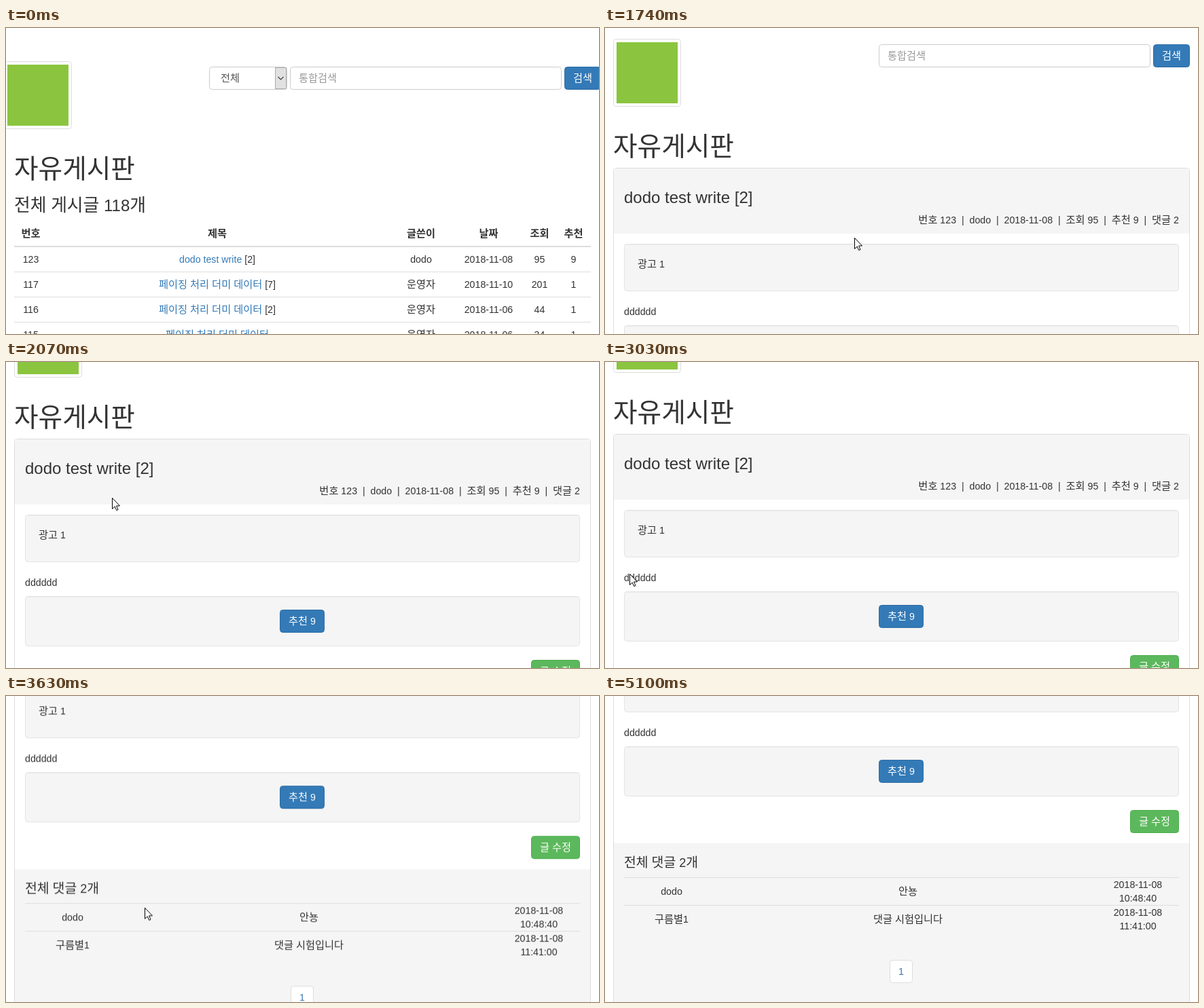
An HTML page for the animation above (7110 ms loop, 873 by 451 pixels).

```html
<!DOCTYPE html>
<html lang="ko">
<head>
<meta charset="utf-8">
<title>자유게시판</title>
<style>
html, body { margin: 0; width: 100%; height: 100%; overflow: hidden; background: #fff; }
svg { display: block; width: 873px; height: 451px; }
text { font: 14.2px "Liberation Sans", "Noto Sans CJK KR", "Noto Sans CJK", sans-serif; fill: #333; }
.ko { font-size: 1.075em; }
.h1 { font-size: 36px; }
.h2 { font-size: 24px; }
.h4 { font-size: 18px; }
.h1 .ko, .h2 .ko { font-weight: 300; }
.mid text { text-anchor: middle; }
.end { text-anchor: end; }
.head text { font-weight: bold; }
.link { fill: #337ab7; }
.on { fill: #fff; }
.hint { fill: #999; }
.box { fill: #fff; stroke: #ccc; }
.thumb { fill: #fff; stroke: #ddd; }
.blue { fill: #337ab7; stroke: #2e6da4; }
.green { fill: #5cb85c; stroke: #4cae4c; }
.well { fill: #f5f5f5; stroke: #e3e3e3; }
.bar { fill: #f5f5f5; }
.line { fill: #ddd; }

.list, .post, .scroll, .cursor, .arrow, .hand, .beam { animation: 7.11s linear infinite; }
.list, .post, .arrow, .hand, .beam { animation-timing-function: step-end; }
.list { animation-name: list; }
.post { animation-name: post; }
.scroll { animation-name: scroll; }
.cursor { animation-name: move; }
.arrow { animation-name: arrow; }
.hand { animation-name: hand; }
.beam { animation-name: beam; }

@keyframes list { 0% { opacity: 1 } 15.61%, 100% { opacity: 0 } }
@keyframes post { 0% { opacity: 0 } 15.61%, 100% { opacity: 1 } }
@keyframes scroll {
  0%, 22.785% { transform: translateY(0) }
  24.4726% { transform: translateY(-33px) }
  29.1139% { transform: translateY(-126px) }
  32.489%, 45.992% { transform: translateY(-133px) }
  49.3671% { transform: translateY(-206px) }
  51.4768%, 100% { transform: translateY(-397px) }
}
@keyframes move {
  0%, 1.265% { transform: translate(848px, 60px) }
  2.11% { transform: translate(747px, 122px) }
  2.532% { transform: translate(688px, 158px) }
  3.797% { transform: translate(565px, 235px) }
  6.329% { transform: translate(380px, 318px) }
  9.705%, 15.61% { transform: translate(312px, 340px) }
  17.2996% { transform: translate(318px, 328px) }
  20.675%, 22.785% { transform: translate(350px, 315px) }
  24.4726% { transform: translate(367px, 309px) }
  29.1139% { transform: translate(156px, 200px) }
  32.489% { transform: translate(60px, 330px) }
  35.021% { transform: translate(150px, 362px) }
  37.553% { transform: translate(164px, 330px) }
  40.084% { transform: translate(70px, 312px) }
  42.616%, 43.038% { transform: translate(36px, 312px) }
  43.882%, 45.992% { transform: translate(167px, 312px) }
  49.3671% { transform: translate(200px, 311px) }
  51.477%, 54.852% { transform: translate(205px, 312px) }
  56.118% { transform: translate(154px, 318px) }
  59.0717% { transform: translate(410px, 319px) }
  60.759% { transform: translate(428px, 316px) }
  64.557%, 64.979% { transform: translate(205px, 300px) }
  67.089% { transform: translate(400px, 242px) }
  69.62% { transform: translate(640px, 342px) }
  71.73%, 100% { transform: translate(815px, 300px) }
}
@keyframes arrow {
  0% { opacity: 0 } 1.26% { opacity: 1 } 7.59% { opacity: 0 } 15.61% { opacity: 1 }
  57.8% { opacity: 0 } 62.44% { opacity: 1 } 71.72%, 100% { opacity: 0 }
}
@keyframes hand { 0% { opacity: 0 } 7.59% { opacity: 1 } 15.61%, 100% { opacity: 0 } }
@keyframes beam { 0% { opacity: 0 } 57.8% { opacity: 1 } 62.44%, 100% { opacity: 0 } }
</style>
</head>
<body>
<svg viewBox="0 0 873 451">
  <defs>
    <g id="logo">
      <rect class="thumb" x="12.5" y="49.5" width="99" height="99" rx="4"/>
      <rect x="17" y="54" width="90" height="90" fill="#8bc53f"/>
    </g>
    <g id="search">
      <rect class="box" x="403.5" y="57.5" width="399" height="33" rx="4"/>
      <text class="hint" x="416" y="79">통합검색</text>
      <rect class="blue" x="807.5" y="57.5" width="53" height="33" rx="4"/>
      <text class="on" x="820" y="79">검색</text>
    </g>
    <text id="title" class="h1" x="12" y="221">자유게시판</text>
  </defs>

  <g class="list">
    <use href="#logo" x="-15"/>
    <rect class="box" x="299.5" y="57.5" width="114" height="33" rx="4"/>
    <text x="316" y="79" style="fill:#555">전체</text>
    <rect x="396.5" y="58.5" width="16" height="31" fill="#e1e1e1" stroke="#adadad"/>
    <path d="M400.5 72l4 4 4-4" fill="none" stroke="#444" stroke-width="1.2"/>
    <use href="#search" x="15"/>
    <use href="#title"/>
    <text class="h2" x="12" y="270">전체 게시글 118개</text>
    <rect class="line" x="12" y="321" width="849" height="2"/>
    <g class="mid" id="rows"></g>
    <rect class="link hand" x="255" y="347" width="92" height="1"/>
  </g>

  <g class="post">
    <g class="scroll">
      <use href="#logo"/>
      <use href="#search"/>
      <use href="#title"/>
      <rect class="thumb" x="12.5" y="239.5" width="848" height="700" rx="4"/>
      <rect class="bar" x="13" y="240" width="847" height="96" rx="3"/>
      <text class="h2" x="28" y="291">dodo test write [2]</text>
      <text class="end" id="meta" x="845" y="321"></text>

      <rect class="well" x="28.5" y="351.5" width="816" height="69" rx="4"/>
      <path d="M30 352.5H843" stroke="#ececec"/>
      <text x="48" y="386">광고 1</text>
      <text x="28" y="456">dddddd</text>
      <rect class="well" x="28.5" y="471.5" width="816" height="73" rx="4"/>
      <path d="M30 472.5H843" stroke="#ececec"/>
      <rect class="blue" x="403.5" y="491.5" width="65" height="33" rx="4"/>
      <text class="on" x="416" y="513">추천 9</text>
      <rect class="green" x="773.5" y="565.5" width="71" height="33" rx="4"/>
      <text class="on" x="786" y="587">글 수정</text>

      <rect class="bar" x="13" y="614" width="847" height="320"/>
      <text class="h4" x="28" y="649">전체 댓글 2개</text>
      <g class="mid" id="replies"></g>
      <rect class="thumb" x="419.5" y="786.5" width="33" height="33" rx="4"/>
      <g class="mid"><text class="link" x="436" y="808">1</text></g>
    </g>
  </g>

  <g class="cursor">
    <path class="arrow" d="M.5 .5V16.5L4.2 13 6.7 18.6 9 17.6 6.6 12H11.5Z" fill="#fff" stroke="#000"/>
    <path class="hand" d="M-1.5 1.5q1.5-2 3 0V8q7-1 9 3v4l-2 6H0L-5.5 13q0-3 4 0Z" fill="#fff" stroke="#000"/>
    <path class="beam" d="M-3-7.5H-1L.5-6.5 2-7.5H4M.5-6.5V7.5M-3 8.5H-1L.5 7.5 2 8.5H4" fill="none" stroke="#000"/>
  </g>
</svg>
<script>
const $ = id => document.getElementById(id);
const text = (x, y, s) => `<text x="${x}" y="${y}">${s}</text>`;
const line = (x, y, w) => `<rect class="line" x="${x}" y="${y}" width="${w}" height="1"/>`;
const link = s => `<tspan class="link">${s}</tspan>`;

const cols = [36.5, 311, 611, 710.5, 785.5, 835.5];
const cells = (row, y) => row.map((s, i) => text(cols[i], y, s)).join('');
const dummy = link('페이징 처리 더미 데이터');
const rows = [
  [123, link('dodo test write') + ' [2]', 'dodo', '2018-11-08', 95, 9],
  [117, dummy + ' [7]', '운영자', '2018-11-10', 201, 1],
  [116, dummy + ' [2]', '운영자', '2018-11-06', 44, 1],
  [115, dummy, '운영자', '2018-11-06', 34, 1]
];
$('rows').innerHTML =
  `<g class="head">${cells(['번호', '제목', '글쓴이', '날짜', '조회', '추천'], 308)}</g>` +
  rows.map((row, i) => cells(row, 346 + 37 * i) + line(12, 359 + 37 * i, 849)).join('');

const replies = [['dodo', '안뇽', '10:48:40'], ['구름별1', '댓글 시험입니다', '11:41:00']];
$('replies').innerHTML = replies.map(([who, body, time], i) => {
  const y = 690 + 41 * i;
  return line(28, y - 26, 817) + text(98, y, who) + text(446, y, body) +
    text(784.5, y - 10, '2018-11-08') + text(784.5, y + 10, time);
}).join('');

$('meta').innerHTML = ['번호 123', 'dodo', '2018-11-08', '조회 95', '추천 9', '댓글 2']
  .join('&nbsp;&nbsp;|&nbsp;&nbsp;');

// Hangul is set slightly larger so that it fills the full em.
document.querySelectorAll('text').forEach(t => {
  t.innerHTML = t.innerHTML.replace(/[가-힣]+/g, '<tspan class="ko">$&</tspan>');
});

// Advance every animation in 30 ms ticks; the small lead absorbs rounding.
document.getAnimations().forEach(a => a.effect.updateTiming({ easing: 'steps(237)', delay: -2 }));
</script>
</body>
</html>
```
